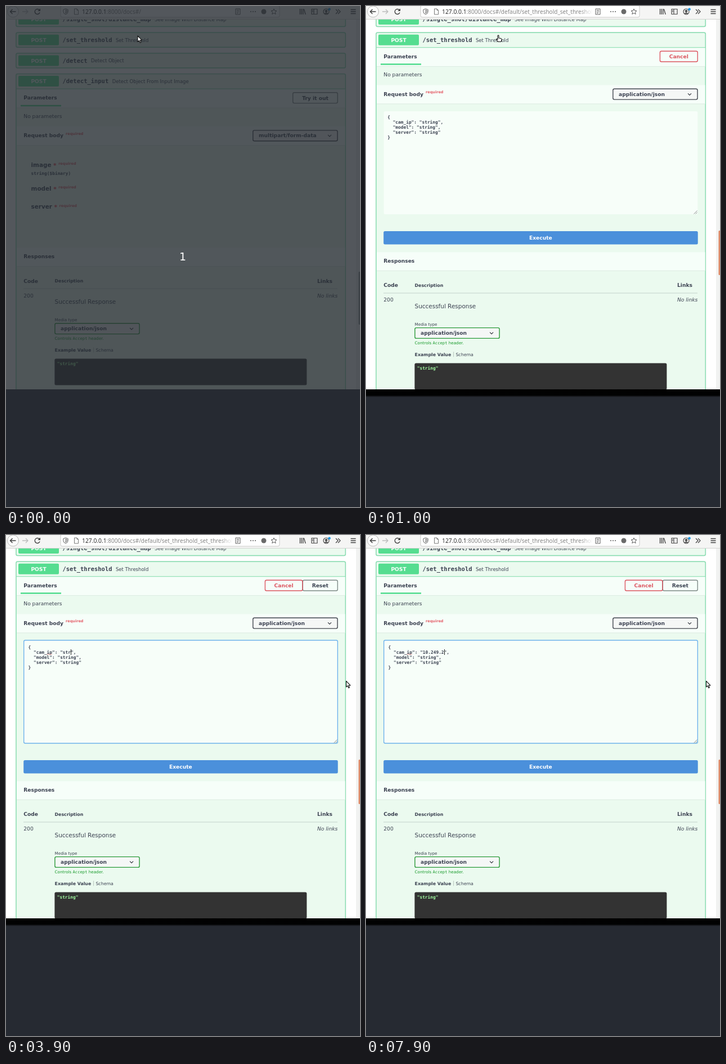
An HTML page with a canvas for the animation above (8 s loop, 629 px wide and 890 px high).

```html
<!DOCTYPE html>
<html lang="en">
<head>
<meta charset="utf-8">
<title>API docs</title>
<style>
html, body { margin: 0; width: 100%; height: 100%; overflow: hidden; background: #262a32; }
canvas { display: block; }
</style>
</head>
<body>
<canvas id="stage" width="629" height="890"></canvas>
<script>
const c = document.getElementById('stage').getContext('2d');
const LOOP = 8000, BOTTOM = 681, Z = 0.653; // Z: page zoom
const INK = '#3b4151', GREEN = '#55dd90', EDGE = '#84dcae', MINT = '#ebfaef', PALE = '#f6fef9', RED = '#dc5560';
const SANS = '"DejaVu Sans", sans-serif', MONO = '"DejaVu Sans Mono", monospace';

// [start time, value] lists; the value holds until the next start
const at = (list, t) => list.reduce((v, [start, x]) => t >= start ? x : v, list[0][1]);

const typed = [[0, '"string'], [3400, '"strin'], [3700, '"stri'], [3900, '"str'], [4000, '"st'],
  [4200, '"'], [4400, ''], [6200, '"'], [6700, '"1'], [6900, '"10'], [7000, '"10.'],
  [7200, '"10.2'], [7500, '"10.249'], [7700, '"10.249.'], [7900, '"10.249.2']];
const mouse = [[0, ['arrow', 234, 53]], [100, ['hand', 234, 52]], [1200, ['hand', 300, 62]],
  [1300, ['arrow', 425, 94]], [1400, ['arrow', 485, 119]], [1600, ['arrow', 446, 123]],
  [1700, ['arrow', 350, 142]], [1800, ['arrow', 236, 170]], [1900, ['beam', 160, 196]],
  [2000, ['beam', 129.5, 204.5]], [2200, ['beam', 129.5, 208]], [2600, ['beam', 262, 216]],
  [2700, ['beam', 505, 246]], [2800, ['arrow', 604.5, 259.5]]];

function text(s, x, y, px, style = '', color = INK, family = SANS, align = 'left') {
  c.font = `${style} ${px}px ${family}`;
  c.fillStyle = color;
  c.textAlign = align;
  c.fillText(s, x, y);
  return x + c.measureText(s).width;
}
const bold = (s, x, y, px = 14 * Z, color, align) => text(s, x, y, px, 'bold', color, SANS, align);
const mono = (s, x, y, px = 12 * Z, color) => text(s, x, y, px, 'bold', color, MONO);

function rect(x, y, w, h, fill) {
  c.fillStyle = fill;
  c.fillRect(x, y, w, h);
}
function box(x, y, w, h, r, fill, stroke, line = 1.4) {
  c.beginPath();
  c.roundRect(x, y, w, h, r);
  if (fill) { c.fillStyle = fill; c.fill(); }
  if (stroke) { c.strokeStyle = stroke; c.lineWidth = line; c.stroke(); }
}
function path(d, x, y, stroke = '#4a4a4a', line = 1.2, fill) {
  c.save();
  c.translate(x, y);
  const p = new Path2D(d);
  if (fill) { c.fillStyle = fill; c.fill(p); }
  c.strokeStyle = stroke;
  c.lineWidth = line;
  c.lineJoin = 'round';
  c.stroke(p);
  c.restore();
}
function shifted(dy, draw) {
  c.save();
  c.translate(0, dy);
  draw();
  c.restore();
}
function clipped(x, y, w, h, draw) {
  c.save();
  c.beginPath();
  c.rect(x, y, w, h);
  c.clip();
  draw();
  c.restore();
}

function band(y, h) {
  rect(19, y, 584, h, PALE);
  rect(19, y + h - 0.5, 584, 1, '#dcebe1');
}
function button(label, x, y, w, color, border = color) {
  box(x, y, w, 18.8, 2.5, null, border);
  bold(label, x + w / 2, y + 12.7, 14 * Z, color, 'center');
}
function select(label, x, y, border) {
  box(x, y, 150.2, 18.8, 2.5, '#f5f7f6', border);
  bold(label, x + 10.2, y + 12.5);
  path('M-3 -1.5L0 1.5L3 -1.5', x + 136.2, y + 9.5, '#30343c', 1.2);
}
const required = (x, y) => bold('required', x, y, 10 * Z, '#e4606a');

// One operation row; height is 26 when closed
function operation(y, route, summary, height = 26, content) {
  c.shadowColor = 'rgba(0,0,0,.19)';
  c.shadowBlur = 2;
  box(18, y, 585.2, height, 2.5, MINT);
  c.shadowBlur = 0;
  box(18, y, 585.2, height, 2.5, null, EDGE);
  if (content) clipped(19, y + 26, 583.5, height - 26, content);
  if (content && height > 27) rect(18, y + 26, 585, 1, EDGE);
  box(22, y + 3.5, 72, 19, 2, GREEN);
  bold('POST', 58, y + 16.6, 14 * Z, '#fff', 'center');
  const end = mono(route, 100.5, y + 16.7, 16 * Z);
  text(summary, end + 6.5, y + 16.4, 13 * Z);
}

// Shared top part, placed for a row whose header starts at y = 120.6
function requestHead(type) {
  band(148, 33);
  bold('Parameters', 31.3, 166.4);
  rect(26, 175.8, 72, 2.6, GREEN);
  text('No parameters', 31.3, 198.6, 14 * Z);
  band(214, 33.5);
  bold('Request body', 31.3, 233.4);
  required(106, 229);
  select(type, 438.8, 220.9, '#41444e');
}

function responses() {
  band(429.5, 33);
  bold('Responses', 31.3, 448);
  bold('Code', 31.3, 491.6);
  bold('Description', 86.6, 491.3, 12 * Z);
  bold('Links', 553, 491.6);
  rect(31, 501.7, 558, 1, '#c3d3cb');
  text('200', 31.3, 517.6, 14 * Z);
  text('No links', 553, 517.6, 14 * Z, 'italic');
  text('Successful Response', 86.6, 529.4, 16 * Z);
  text('Media type', 86.6, 560.2, 11 * Z);
  select('application/json', 86.9, 563.8, '#2a9a38');
  const green = '#179a2a', px = 11 * Z;
  let x = text('Controls ', 86.6, 593, px, '', green);
  x = text('Accept', x, 593, px, '', green, MONO);
  text(' header.', x, 593, px, '', green);
  bold('Example Value', 86.6, 614, 12 * Z);
  rect(155.3, 606.5, 0.8, 9, '#a9b5b0');
  text('Schema', 159.4, 614, 12 * Z);
  box(86.4, 626.6, 448, 47, 2.5, '#333');
  mono('"string"', 90.7, 638.2, 12 * Z, '#a2fca2');
}

function inputForm() {
  requestHead('multipart/form-data');
  button('Try it out', 509.7, 153.8, 79.5, INK, '#7f8a88');
  [['image', 286], ['model', 328], ['server', 360.4]].forEach(([name, y]) => {
    const end = bold(name, 44.5, y, 16 * Z);
    bold('*', end + 3.5, y + 0.6, 16 * Z, '#e8323c');
    required(end + 12.6, y - 3.6);
  });
  mono('string($binary)', 44.5, 300.2);
  responses();
}

function jsonBody(t) {
  const focus = t >= 2400, d = focus ? 1.4 : 0, x = 38.2 + d, y = 200.2 + d;
  box(31.7, 187, 557.6, 183, 2.5, '#f7fef9', focus ? '#6fb2ec' : null);
  path('M0 6L6 0M3 6L6 3', 582.5, 363.5, '#8a918e', 1);
  const value = at(typed, t), head = '  "cam_ip": ';
  ['{', `${head}${value}",`, '  "model": "string",', '  "server": "string"', '}']
    .forEach((s, i) => mono(s, x, y + i * 9.05));
  if (!focus) return;
  const advance = c.measureText('0').width;
  path('M0 0l1.5 1l1.5 -1l1.5 1l1.5 -1l1.5 1l1.5 -1', x + 7 * advance, 211.5, '#d86a6a', 0.8);
  if (t < 4800 || t >= 6100) rect(Math.round(x + (head + value).length * advance), 203, 1, 10, '#222');
}

function thresholdForm(t) {
  shifted(-73.6, () => requestHead('application/json'));
  if (t < 3400) button('Cancel', 522.4, 80.2, 66.8, RED);
  else {
    button('Reset', 527.3, 80.2, 61.9, INK, '#7f8a88');
    button('Cancel', 460.4, 80.2, 66.4, RED);
  }
  jsonBody(t);
  box(31.2, 400.1, 558.5, 23.3, 2.5, '#4b90db');
  bold('Execute', 310.3, 414.6, 14 * Z, '#fff', 'center');
  shifted(7.8, responses);
}

function page(t) {
  rect(0, 0, 629, BOTTOM, '#fff');
  const k = Math.max(0, Math.min(1, (t - 400) / 600)), open = t < 500 ? 0 : 760 * k * k;
  operation(10.5, '/single_shot/distance_map', 'See Image With Distance Map');
  operation(47.2, '/set_threshold', 'Set Threshold', 26 + open, open ? () => thresholdForm(t) : null);
  shifted(open, () => {
    operation(84, '/detect', 'Detect Object');
    operation(120.6, '/detect_input', 'Detect Object From Input Image', 700, inputForm);
  });
  rect(622, 24, 7, BOTTOM - 24, '#f1f2f1');
  if (t < 500) box(626.5, 472, 4, 94, 1.5, '#8e9391');
  else box(626.5, 472 - 73 * k, 4, 94 - 15 * k, 1.5, '#df8a68');
}

function toolbar(t) {
  rect(0, 0, 629, 23.5, '#f5f5f4');
  rect(0, 23, 629, 1, '#d3d3d1');
  box(97, -1, 389, 21, 3, '#fff', '#c9c9c7', 1);
  box(2.5, 0, 20, 20, 10, '#fbfbfb', '#b9b9b8', 1);
  path('M5 0H-5M-1 -4L-5 0L-1 4', 12.5, 10, '#3f3f3f', 1.5);
  path('M-5 0H5M1 -4L5 0L1 4', 34, 10, '#bcbcbc', 1.3);
  path('M4 -2.5A4.5 4.5 0 1 0 4.5 1.5M4.8 -5V-1.6H1.4', 55.5, 10, '#3f3f3f', 1.4);
  path('M0 -5L4.2 -3.5V0Q4 3.5 0 5Q-4 3.5 -4.2 0V-3.5ZM0 -3V3Q2.5 1.5 2.5 -2Z', 106, 10, '#666', 1);
  path('M-3.5 -5H1L3.5 -2.5V5H-3.5ZM1 -5V-2.5H3.5', 125, 10, '#777', 1);
  const url = '"Noto Sans", sans-serif';
  const x = text('127.0.0.1', 135, 13.8, 10.3, '', '#2e2e2e', url);
  const fade = c.createLinearGradient(380, 0, 403, 0);
  fade.addColorStop(0, '#858585');
  fade.addColorStop(1, '#85858500');
  clipped(135, 0, 268, 22, () =>
    text(':8000/docs#/' + (t < 500 ? '' : 'default/set_threshold_set_threshold'), x, 13.8, 10, '', fade, url));
  path('M-4 -5H4V5H-4ZM-2 -2.5H2M-2 0H2M-2 2.5H1', 412, 10, '#5c5c5c', 1);
  for (let i = -1; i < 2; i++) box(438 + i * 4, 9, 2, 2, 1, '#5c5c5c');
  box(453.5, 5.5, 9, 9, 4.5, '#6a6a6a');
  path('M0 -5L1.5 -1.6L5 -1.4L2.3 1L3.2 4.5L0 2.6L-3.2 4.5L-2.3 1L-5 -1.4L-1.5 -1.6Z', 476, 10, '#5c5c5c', 1);
  path('M-4.5 -5V5M-1.8 -5V5M.9 -5V5M2.4 -4.5L5.2 5', 527, 10, '#4a4a4a', 1.4);
  path('M-5 -4.5H5V4.5H-5ZM-1 -4.5V4.5M-4 -2H-2M-4 0H-2', 548, 10);
  path('M5 0A5 5 0 1 1 -5 0A5 5 0 1 1 5 0', 569, 10);
  path('M2 -1A2 2 0 1 1 -2 -1A2 2 0 1 1 2 -1M-3 3.5Q0 0 3 3.5Z', 569, 10, '#4a4a4a', 0.6, '#4a4a4a');
  box(572.3, 3.5, 4.6, 4.6, 2.3, '#1e9be8');
  path('M-4 -4L0 0L-4 4M0 -4L4 0L0 4', 590, 10, '#4a4a4a', 1.4);
  path('M-4.5 -3.5H4.5M-4.5 0H4.5M-4.5 3.5H4.5', 617, 10, '#3f3f3f', 1.3);
}

function shadow(t) {
  if (t < 300) return;
  const g = c.createLinearGradient(0, BOTTOM, 0, 695);
  g.addColorStop(0, '#000');
  g.addColorStop(0.75, '#000000f0');
  g.addColorStop(1, '#00000000');
  c.globalAlpha = t < 500 ? 0.6 : 1;
  rect(0, BOTTOM, 629, 14, g);
  c.globalAlpha = 1;
}

function pointer([kind, x, y]) {
  if (kind === 'beam') {
    const d = 'M-2 -5H2M0 -5V5M-2 5H2';
    path(d, x, y, '#fff', 2.6);
    path(d, x, y, '#111', 1.7);
  } else if (kind === 'hand') {
    path('M0 1Q.2 0 1 0Q1.9 0 2 1V5L5.5 5.5Q7 6 7 7.5Q7 9.5 6 11.5H.8L-2.6 7.6Q-3 6.6 -1.8 6.6L0 7.6Z', x, y, '#111', 1.1, '#fff');
  } else {
    path('M0 0V10.5L2.4 8.3L4.2 12.2L5.9 11.4L4.2 7.7H7.4Z', x, y, '#111', 1.1, '#fff');
  }
}

function draw(t) {
  rect(0, 0, 629, 890, '#262a32');
  shadow(t);
  clipped(0, 0, 629, BOTTOM, () => {
    page(t);
    toolbar(t);
  });
  if (t < 100) {
    rect(0, 0, 629, BOTTOM, 'rgba(38,42,49,.79)');
    text('1', 314, 452, 19, '', '#fff', SANS, 'center');
  }
  pointer(at(mouse, t));
}

function tick(now) {
  draw(Math.floor((now % LOOP) / 100) * 100);
  requestAnimationFrame(tick);
}
draw(0);
requestAnimationFrame(tick);
</script>
</body>
</html>
```
